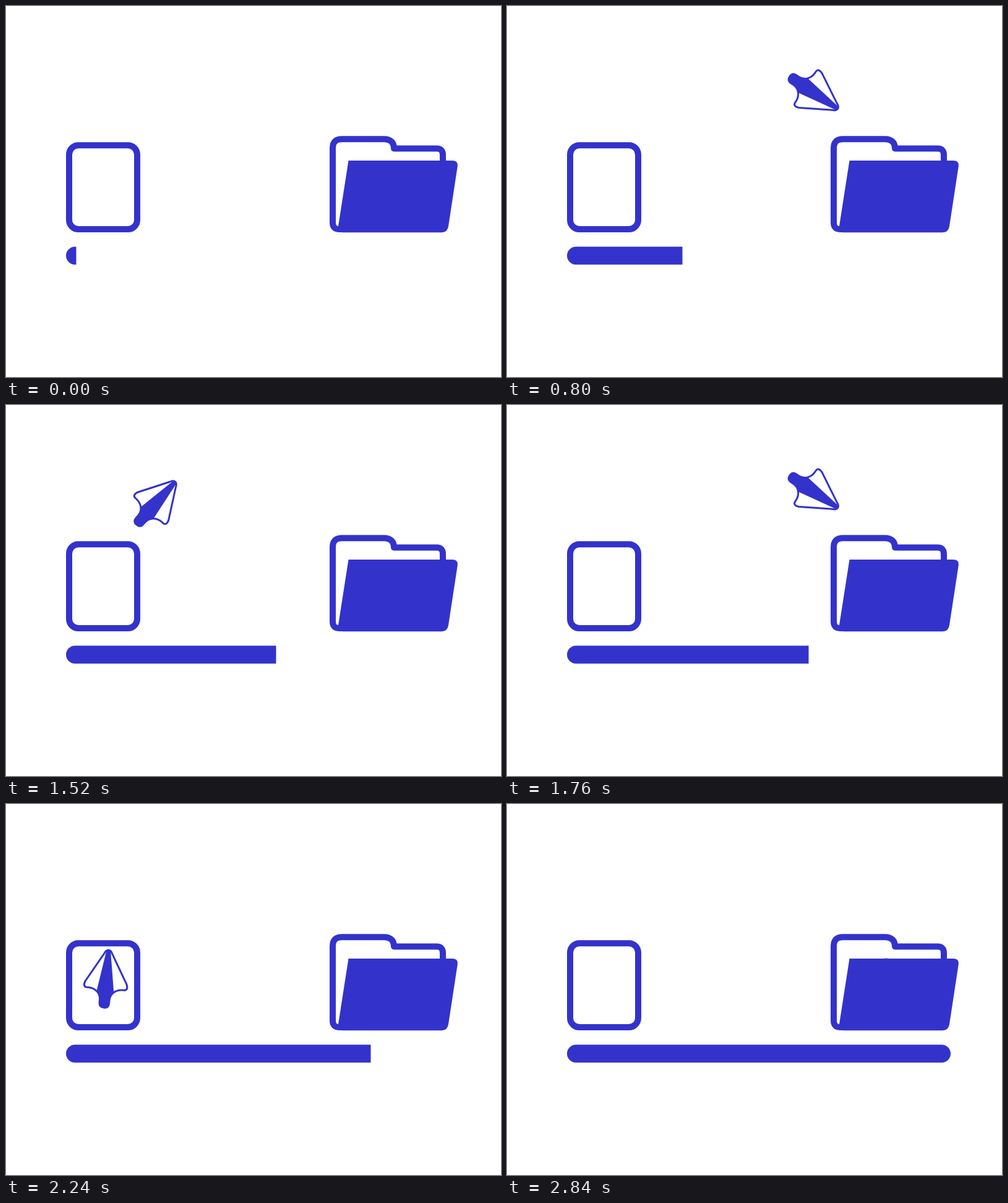
An HTML page with a canvas for the animation above (2.88 s loop, 800 by 600 pixels).

```html
<!DOCTYPE html>
<html lang="en">
<head>
<meta charset="utf-8">
<title>File transfer</title>
<style>
  html, body { margin: 0; width: 100%; height: 100%; overflow: hidden; background: #fff; }
  canvas { display: block; }
</style>
</head>
<body>
<canvas id="stage" width="800" height="600"></canvas>
<script>
const ctx = document.getElementById('stage').getContext('2d');
const BLUE = '#3333cc';
const LOOP = 2880, FLIGHT = 960, STEP = 40;

// Flight of the plane's centre: [time, x, y]
const flight = [
  [180, 157.5, 297.5], [320, 162, 283], [440, 186.5, 232.5], [560, 242, 159],
  [640, 310, 105], [720, 402, 86.5], [800, 495.5, 140], [880, 579, 235], [920, 612.5, 297.5]
];

const sheet = new Path2D();
sheet.roundRect(102, 225.2, 110, 135.8, 15);

const folderBack = new Path2D(
  'M706 256V241Q706 230.5 696 230.5H627C627 221 622 215.2 611 215.2H543' +
  'C533 215.2 528 220 528 230V350Q528 361 538 361H546');

const folderFront = new Path2D(
  'M553.5 250H721Q731 250 729.8 259L715 356Q713.5 366.2 704 366.2H544Q535.5 366.2 537 356Z');

const bar = new Path2D();
bar.roundRect(97, 389.2, 620, 29, 14.5);

const planeOutline = new Path2D(
  'M0-47C3.5-47 5-45 6.5-41L33.5 6C36 12 35 15.8 30 15.8H27.5' +
  'C16 16 7.8 24 7.8 34V39Q7.8 46.5 0 46.5Q-7.8 46.5-7.8 39V34' +
  'C-7.8 24-16 16-27.5 15.8H-30C-35 15.8-36 12-33.5 6L-6.5-41C-5-45-3.5-47 0-47Z');

const planeBody = new Path2D('M-3-48H3L14 21V50H-14V21Z');

// Slope at a flight point, weighted by the neighbouring spans
function slope(i, axis) {
  if (i === 0) return 0;
  const rate = k => (flight[k + 1][axis] - flight[k][axis]) / (flight[k + 1][0] - flight[k][0]);
  if (i === flight.length - 1) return rate(i - 1);
  const before = flight[i][0] - flight[i - 1][0];
  const after = flight[i + 1][0] - flight[i][0];
  return (rate(i - 1) * after + rate(i) * before) / (before + after);
}

function along(t, axis) {
  const last = flight.length - 1;
  if (t <= flight[0][0]) return flight[0][axis];
  if (t >= flight[last][0]) return flight[last][axis];
  let i = 0;
  while (t > flight[i + 1][0]) i++;
  const span = flight[i + 1][0] - flight[i][0];
  const u = (t - flight[i][0]) / span, v = 1 - u;
  return v * v * (1 + 2 * u) * flight[i][axis] + u * u * (3 - 2 * u) * flight[i + 1][axis] +
    span * u * v * (v * slope(i, axis) - u * slope(i + 1, axis));
}

function heading(t) {
  const u = Math.min(1, Math.max(0, (t - 180) / 735));
  return Math.PI * u ** 2.2;
}

function outline(path, width) {
  ctx.lineWidth = width;
  ctx.stroke(path);
}

function drawPlane(t) {
  ctx.save();
  ctx.globalAlpha = Math.min(1, t / 200);
  ctx.translate(along(t, 1), along(t, 2));
  ctx.rotate(heading(t));
  ctx.fillStyle = '#fff';
  ctx.fill(planeOutline);
  ctx.save();
  ctx.clip(planeOutline);
  ctx.fillStyle = BLUE;
  ctx.fill(planeBody);
  ctx.restore();
  outline(planeOutline, 3);
  ctx.restore();
}

function drawBar(t) {
  ctx.save();
  ctx.beginPath();
  ctx.rect(97, 380, 16.5 + t * 0.2125, 50);
  ctx.clip();
  ctx.fill(bar);
  ctx.restore();
}

function draw(now) {
  const t = Math.floor((now % LOOP) / STEP) * STEP;
  ctx.fillStyle = '#fff';
  ctx.fillRect(0, 0, 800, 600);
  ctx.fillStyle = ctx.strokeStyle = BLUE;
  ctx.lineJoin = 'round';
  drawBar(t);
  outline(sheet, 10);
  outline(folderBack, 10);
  drawPlane(t % FLIGHT);
  ctx.fill(folderFront);
}

const start = performance.now();
function tick() {
  draw(performance.now() - start);
  requestAnimationFrame(tick);
}
tick();
</script>
</body>
</html>
```
